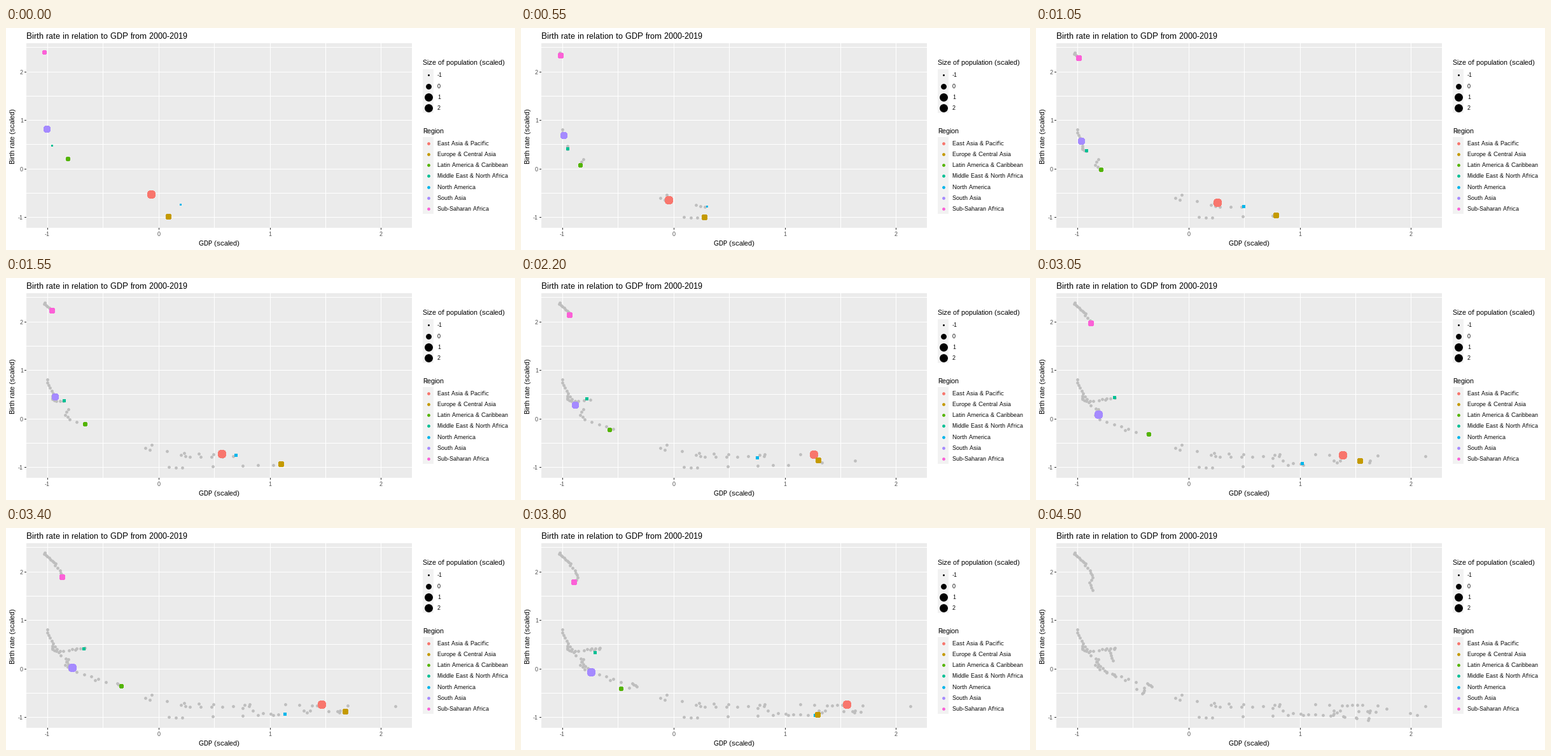
Animation of 800 by 350 pixels, one loop 5000 ms. Source, as a matplotlib script:

```python
import numpy as np
import matplotlib.pyplot as plt
from matplotlib.animation import FuncAnimation
from matplotlib.patches import Rectangle

WIDTH, HEIGHT, DPI = 800, 350, 100
PX = 72 / DPI
YEARS = np.arange(20)
FRAMES, LAST_MOVE = 100, 90
SLOW_FRAMES, SLOW_YEARS = 65, 13
DOT = 4.8

plt.rcParams.update({"font.family": "Liberation Sans",
                     "text.hinting": "native", "text.hinting_factor": 1})


def diameter(share):
    """Whole-pixel dot width; the radius grows with the root of the share."""
    return 2 * np.floor(1.7 + 5.28 * np.sqrt(share)) + .9


class Region:
    """A path through a few (year, x, y) points and a growing population share."""

    def __init__(self, name, color, share, *path):
        self.name, self.color, self.share = name, color, share
        self.path = np.transpose(path)

    def position(self, year):
        years, x, y = self.path
        return np.round([np.interp(year, years, x), np.interp(year, years, y)]).T + .5

    def size(self, year):
        return diameter(np.interp(year, YEARS[[0, -1]], self.share))


REGIONS = [
    Region("East Asia & Pacific", "#F8766D", (.857, 1),
           (0, 228, 262), (1, 218, 267), (2, 225, 270), (4, 279, 275), (6, 325, 277),
           (8, 438, 277), (9, 460, 278), (11, 611, 280), (12, 480, 279),
           (16, 512, 278), (18, 587, 291), (19, 598, 294)),
    Region("Europe & Central Asia", "#C49A00", (.27, .3),
           (0, 255, 297), (2, 276, 298), (4, 371, 295), (6, 419, 294), (8, 524, 287),
           (9, 467, 287), (10, 477, 287), (11, 523, 290), (12, 506, 288),
           (14, 533, 289), (15, 467, 292), (16, 466, 294), (19, 521, 302)),
    Region("Latin America & Caribbean", "#53B400", (.1, .164),
           (0, 97, 206), (2, 92, 215), (4, 99, 222), (8, 144, 237), (9, 139, 239),
           (11, 174, 244), (14, 181, 249), (16, 157, 253), (17, 169, 255),
           (19, 166, 260)),
    Region("Middle East & North Africa", "#00C094", (0, .07),
           (0, 72, 185), (2, 72, 190), (4, 78, 193), (6, 89, 193), (8, 108, 191),
           (9, 103, 190), (12, 123, 188), (14, 122, 190), (15, 114, 192),
           (19, 120, 208)),
    Region("North America", "#00B6EB", (0, .016),
           (0, 274, 278), (2, 288, 281), (5, 339, 281), (7, 374, 278), (8, 381, 280),
           (9, 371, 283), (11, 403, 291), (16, 462, 295), (19, 522, 299)),
    Region("South Asia", "#A58AFF", (.53, .75),
           (0, 64, 159), (1, 64, 164), (5, 73, 181), (9, 85, 200), (10, 93, 205),
           (12, 97, 214), (16, 110, 227), (17, 119, 229), (19, 124, 233)),
    Region("Sub-Saharan Africa", "#FB61D7", (.174, .39),
           (0, 60, 38), (1, 59, 40), (8, 77, 55), (9, 76, 58), (11, 84, 66),
           (14, 88, 77), (16, 83, 85), (19, 88, 97)),
]
# Larger dots cover the smallest region where they meet.
DRAW_ORDER = sorted(REGIONS, key=lambda r: r.name != "North America")

fig = plt.figure(figsize=(WIDTH / DPI, HEIGHT / DPI), dpi=DPI, facecolor="white")
ax = fig.add_axes([0, 0, 1, 1])
ax.set(xlim=(0, WIDTH), ylim=(HEIGHT, 0))
ax.axis("off")


def box(x, y, width, height, color):
    ax.add_patch(Rectangle((x, y), width, height, fc=color, lw=0, aa=False, zorder=0))


def label(x, y, text, size, color="black", **kw):
    kw.setdefault("va", "baseline")
    ax.text(x, y, text, fontsize=size * PX, color=color, **kw)


def dots(x, y, size, color, zorder=3):
    return ax.scatter(x, y, s=(np.asarray(size) * PX) ** 2, c=color,
                      linewidths=0, antialiased=False, zorder=zorder)


def draw_panel():
    box(32, 24, 606, 291, "#EBEBEB")
    for half in range(-2, 5):
        x = int(240.3 + 87.4 * half)
        box(x, 24, 1, 291, "white")
        if half % 2 == 0:
            box(x, 315, 1, 3, "#333333")
            label(x, 328, str(half // 2), 9, "#4D4D4D", ha="center")
    for half in range(-2, 6):
        y = int(222.1 - 38.25 * half)
        box(32, y, 606, 1, "white")
        if half % 2 == 0:
            box(29, y, 3, 1, "#333333")
            label(27, y + 4, str(half // 2), 9, "#4D4D4D", ha="right")
    label(32, 17, "Birth rate in relation to GDP from 2000-2019", 13)
    label(335, 343, "GDP (scaled)", 11, ha="center")
    label(11.5, 170.5, "Birth rate (scaled)", 11, ha="center", va="center", rotation=90)


def draw_legend(title, title_y, top, entries):
    label(655, title_y, title, 11)
    box(655, round(top), 17, round(17.28 * len(entries)), "#F2F2F2")
    for i, (name, size, color) in enumerate(entries):
        y = round(top + 17.28 * (i + .5))
        dots([663.5], [y + .5], [size], [color])
        label(678, y + 4, name, 9)


def timeline(frame):
    """Current year and count of years left behind; each year is held one frame."""
    start, first, pace = (0, 0, 5) if frame <= SLOW_FRAMES else (SLOW_FRAMES, SLOW_YEARS, 4)
    year, step = divmod(frame - start, pace)
    return first + year + step / (pace - 1), first + year + (step > 0)


draw_panel()
draw_legend("Size of population (scaled)", 58, 64.6,
            [(str(n), diameter((n + 1) / 3), "black") for n in range(-1, 3)])
draw_legend("Region", 166, 172, [(r.name, DOT, r.color) for r in REGIONS])

trail = dots([], [], [], "#BEBEBE", zorder=4)
trail.set_sizes([(DOT * PX) ** 2])
blank = np.zeros(len(REGIONS))
current = dots(blank, blank, blank, [r.color for r in DRAW_ORDER], zorder=5)


def update(frame):
    year, past = timeline(frame)
    trail.set_offsets(np.concatenate([r.position(YEARS[:past]) for r in REGIONS]))
    current.set_offsets([r.position(year) for r in DRAW_ORDER])
    current.set_sizes([(r.size(year) * PX) ** 2 for r in DRAW_ORDER])
    current.set_visible(frame < LAST_MOVE)
    return trail, current


anim = FuncAnimation(fig, update, frames=FRAMES, interval=50,
                     init_func=lambda: update(0), repeat=True, repeat_delay=0, blit=False)
plt.show()
```
